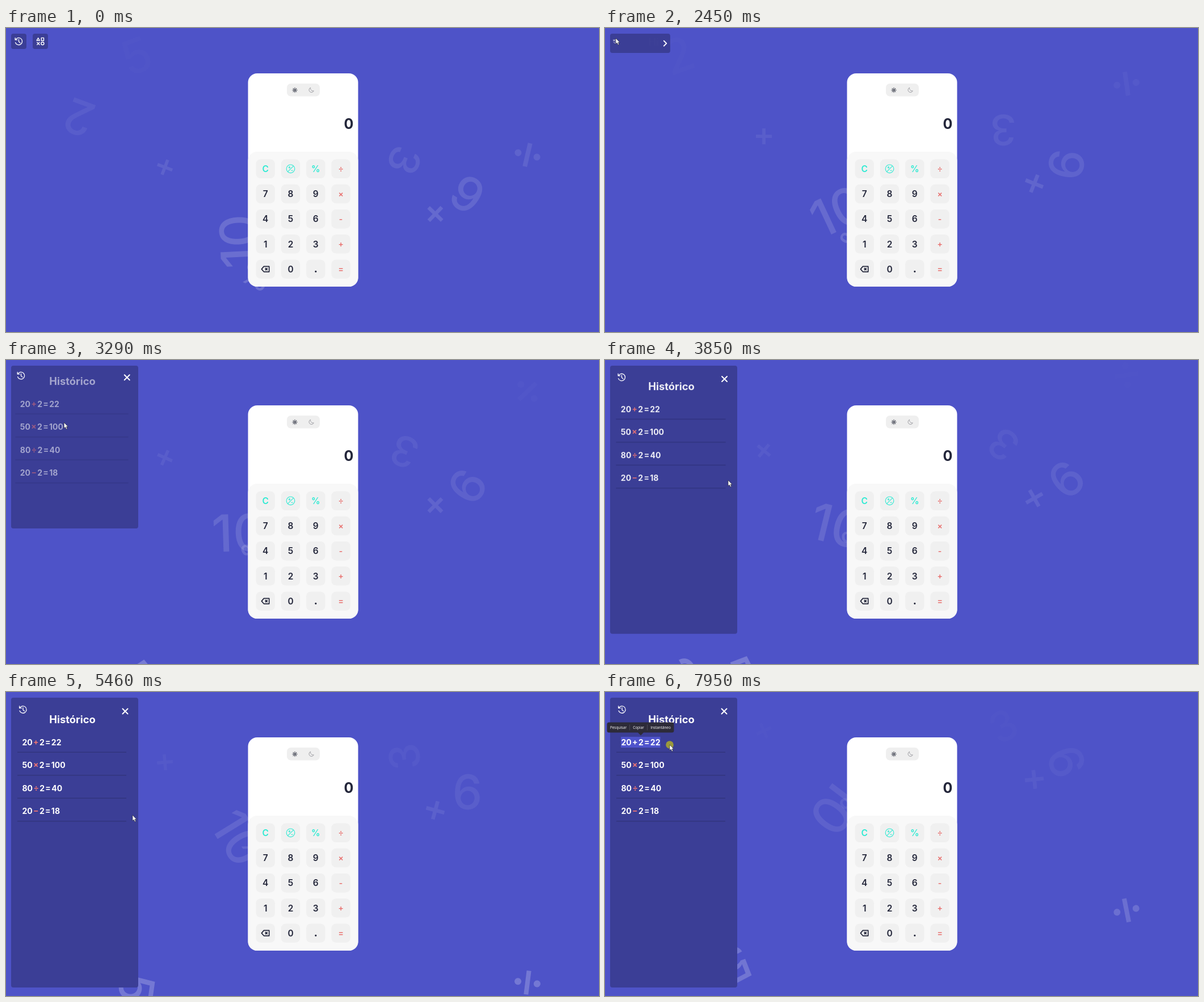
Animation, 1045 px wide and 536 px high, one loop 8 s. Source, as an HTML page:

```html
<!DOCTYPE html>
<html lang="pt">
<head>
<meta charset="utf-8">
<style>
html, body { margin: 0; width: 100%; height: 100%; overflow: hidden; background: #4e53c8; }
svg { display: block; font-family: Inter, "Open Sans", sans-serif; }
.line { fill: none; stroke: #fff; stroke-linecap: round; stroke-linejoin: round; }
text { text-anchor: middle; }
.rows text { text-anchor: start; font-weight: 700; font-size: 14px; word-spacing: -2px; fill: #fff; }
.rows tspan { fill: #ee7472; }
#popup text { font: 6.4px "Open Sans", "Noto Sans", sans-serif; fill: #fff; }
</style>
</head>
<body>
<svg width="1045" height="536">
  <defs>
    <g id="clock" class="line" stroke-width="1.3">
      <path d="M-5.6-2.8A6.2 6.2 0 1 1-5.9 2.2M-6.3-6.2V-2.6H-2.7M0-3.4V.4L2.4 2.6"/>
    </g>
    <clipPath id="clip"><rect id="clipBox" x="9" y="10" rx="4"/></clipPath>
  </defs>
  <g id="floats" fill="#fff"></g>
  <g id="card">
    <rect x="426.5" y="80" width="194" height="376" rx="16" fill="#fff"/>
    <rect x="426.5" y="218" width="194" height="238" rx="16" fill="#f8f8f8"/>
    <rect x="495" y="98" width="58" height="22.5" rx="7" fill="#efefef"/>
    <g transform="translate(509 109.5)" stroke="#282c3c" fill="none" stroke-linecap="round">
      <circle r="1.7" stroke-width="1.3"/>
      <path id="rays" stroke-width="1.1"/>
    </g>
    <path d="M536.7 105.2A4.3 4.3 0 1 0 542.3 110.8A4.6 4.6 0 0 1 536.7 105.2Z" fill="none" stroke="#9d9da3"/>
    <text x="604" y="177.5" font-size="25" font-weight="700" fill="#23263a">0</text>
    <g id="keys" font-weight="600"></g>
  </g>
  <g transform="translate(47 10)">
    <rect width="27" height="27" rx="4" fill="#3b3e96"/>
    <path class="line" stroke-width="1.4" d="M9.7 7.6L12.3 12H7.1ZM15.3 7.4H19.5V12.2H15.3ZM7.8 15.2L12 19.5M12 15.2L7.8 19.5M19.9 17.3A2.5 2.5 0 1 1 14.9 17.3A2.5 2.5 0 1 1 19.9 17.3Z"/>
  </g>
  <rect id="panel" x="9" y="10" rx="4" fill="#3b3e96"/>
  <use href="#clock" id="icon"/>
  <path id="cross" class="line" stroke-width="2"/>
  <g clip-path="url(#clip)"><g id="history">
    <text id="title" x="117" y="55" font-size="18.4" font-weight="700" fill="#fff">Histórico</text>
    <rect id="sel" y="79" height="19" fill="#4f54cc"/>
    <g class="rows" id="rows"></g>
    <g id="rules" stroke="#32357f" stroke-width="1.5"></g>
  </g></g>
  <g id="popup">
    <path d="M7 53.5H118Q121.500 53.5 121.500 57V68Q121.500 71.5 118 71.5H68L63 76.500L58 71.5H7Q3.500 71.5 3.500 68V57Q3.500 53.5 7 53.5Z" fill="#2d2b39"/>
    <path d="M43.500 57.500V67.500M74.500 57.500V67.500" stroke="#4a4856"/>
    <text x="23.500" y="64.500">Pesquisar</text><text x="59" y="64.500">Copiar</text><text x="98" y="64.500">Instantâneo</text>
  </g>
  <g id="cursor">
    <circle id="press" r="6.800" fill="#dcd700" opacity=".6"/>
    <path id="beam" d="M0-5V5" stroke="#3b3e60"/>
    <path id="arrow" d="M0 0V10L2.300 8L4 11.800L5.700 11L4.100 7.400H7Z" fill="#fff" stroke="#222" stroke-width=".6"/>
  </g>
</svg>
<script>
const $ = id => document.getElementById(id);
const set = (el, attrs) => { for (const k in attrs) el.setAttribute(k, attrs[k]); };
const show = (id, on) => $(id).style.display = on ? '' : 'none';
const clamp = (v, lo, hi) => Math.min(hi, Math.max(lo, v));
const ease = (t, from, to) => { const u = clamp((t - from) / (to - from), 0, 1); return u * u * (3 - 2 * u); };
const mix = (a, b, u) => a + (b - a) * u;

// Rising symbols: glyph, x, start y, seconds per rise, phase at time 0, size
const floats = [
  ['9', 813, 602, 26.5, .544, 84], ['3', 702, 606, 26, .656, 74],
  ['×', 756.5, 611, 26, .4985, 33], ['+', 280, 617, 25.5, .654, 28],
  ['10', 410, 587, 26, .371, 90], ['2', 129, 600, 12.6, .778, 84],
  ['5', 230, 600, 33, .9707, 84], ['%', 441, 600, 19, .287, 56],
  ['÷', 919, 589, 11.1, .643, 42]
];
const bar = (w, h, turn = 0) => `<rect x="${-w / 2}" y="${-h / 2}" width="${w}" height="${h}" transform="rotate(${turn})"/>`;
const plus = (s, turn) => `<path transform="rotate(${turn}) scale(${s / 2})" d="M-1-.2H-.2V-1H.2V-.2H1V.2H.2V1H-.2V.2H-1Z"/>`;
const shape = (c, s) =>
  c == '+' ? plus(s, 0) :
  c == '×' ? plus(s, 45) :
  c == '÷' ? bar(s, 8) + '<circle cy="-17" r="6"/><circle cy="17" r="6"/>' :
  `<text font-size="${s}" font-weight="500" y="${s * .364}">${c}</text>`;
$('floats').innerHTML = floats.map(f => `<g>${shape(f[0], f[5])}</g>`).join('');

$('rays').setAttribute('d', [...Array(8)].map((_, i) => {
  const c = Math.cos(i * Math.PI / 4), s = Math.sin(i * Math.PI / 4);
  return `M${c * 3.4} ${s * 3.4}L${c * 4.1} ${s * 4.1}`;
}).join(''));

const sign = '<g fill="none" stroke="#2eead3" stroke-width="1.1"><circle r="7.3"/><path d="M-5 5L5-5M-4-2.500H0M-2-4.500V-.5M.8 3H4.300"/></g>';
const back = '<path fill="none" stroke="#23263a" stroke-width="1.700" stroke-linejoin="round" d="M-6.800 0L-2.800-4.700H6.500V4.700H-2.800ZM-.5-2L3.500 2M3.500-2L-.5 2"/>';
const keys = ['C', sign, '%', '÷', '7', '8', '9', '×', '4', '5', '6', '-', '1', '2', '3', '+', back, '0', '.', '='];
$('keys').innerHTML = keys.map((k, i) => {
  const col = i % 4, row = i >> 2;
  const color = col == 3 ? '#e8716f' : row ? '#23263a' : '#2eead3';
  const size = k == '.' ? 21 : col == 3 ? 14 : 15.5;
  const y = k == '.' ? 5.5 : size * .364;
  const label = k.length > 1 ? k : `<text font-size="${size}" y="${y}" fill="${color}">${k}</text>`;
  return `<g transform="translate(${457.2 + col * 44.3} ${248.3 + row * 44.2})"><rect x="-16.700" y="-16.700" width="33.400" height="33.400" rx="8" fill="#f0f0f0"/>${label}</g>`;
}).join('');

const sums = ['20 + 2 = 22', '50 × 2 = 100', '80 ÷ 2 = 40', '20 − 2 = 18'];
$('rows').innerHTML = sums.map((s, i) =>
  `<text x="28.500" y="${93.6 + i * 40.5}">${s.replace(/[+×÷−]/, '<tspan>$&</tspan>')}</text>`).join('');
$('rules').innerHTML = sums.map((_, i) => `<path d="M20 ${106.3 + i * 40.5}H212"/>`).join('');
const firstSign = document.querySelector('#rows tspan');

// Pointer stops: time, x, y
const stops = [
  [100, 1034, 524], [830, 775, 484], [1700, 24, 42], [1900, 19, 18], [2750, 19, 18],
  [3290, 102, 110], [3850, 217, 212], [4150, 223, 217], [5900, 223, 217],
  [6480, 98, 94], [6560, 88, 95], [6650, 70, 95], [6710, 59, 95], [6900, 23, 95],
  [7150, 23, 95], [7600, 114, 93]
];
function pointer(t) {
  let i = stops.findIndex(s => s[0] > t);
  if (i < 0) return stops[stops.length - 1].slice(1);
  i = Math.max(i, 1);
  const [a, b] = [stops[i - 1], stops[i]];
  const u = clamp((t - a[0]) / (b[0] - a[0]), 0, 1);
  return [mix(a[1], b[1], u), mix(a[2], b[2], u)];
}

function drawFloats(t) {
  floats.forEach(([, x, y, secs, phase], i) => {
    const p = (phase + t / secs / 1000) % 1;
    set($('floats').children[i], {
      transform: `translate(${x} ${y - 568 * p}) rotate(${720 * p})`,
      opacity: .25 * (1 - p)
    });
  });
}

function drawPanel(t) {
  const p = ease(t, 2320, 4170), wide = ease(t, 2230, 2740);
  const width = 27 + 197 * wide, height = 27 + 484 * p;
  set($('panel'), { width, height });
  set($('clipBox'), { width, height });

  const dip = ease(t, 2230, 2450) - ease(t, 2450, 2900);
  const c = 22.5 + 7.5 * p;
  set($('icon'), { transform: `translate(${c - 4.5 * dip} ${c + 1}) scale(${1 - .5 * dip})` });

  // The chevron opens into a cross
  const m = ease(t, 2460, 2800);
  const a = mix(-2, -4.5, m), tip = mix(2.5, 4.5, m), end = 4.5 * m;
  set($('cross'), {
    d: `M${a}-4.500L${tip} ${end}M${a} 4.500L${tip} ${-end}`,
    transform: `translate(${9 + width - 23 + 7 * (1 - p) + 7 * (1 - m)} ${27 + 7 * p})`,
    opacity: ease(t, 2230, 2400)
  });

  const rest = 1 - p;
  set($('history'), { opacity: p, transform: `translate(0 ${-24 * rest})` });
  set($('rows'), { transform: `translate(${-8 * rest} 0)` });
  set($('rules'), { transform: `translate(${-116 * rest * .08} 0) scale(${1 + .08 * rest} 1)` });
}

function drawPointer(t) {
  const [x, y] = pointer(t);
  const dragging = t >= 6500 && t < 7100;
  show('cursor', t >= 100);
  set($('cursor'), { transform: `translate(${x} ${y})` });
  show('press', dragging || t >= 7600);
  const beam = t >= 6400 && t < 7250;
  show('beam', beam);
  show('arrow', !beam);

  const from = t < 6500 ? 97 : t < 7150 ? clamp(x + 19, 28, 97) : 28;
  const left = t > 6900 ? 28 : from;
  set($('sel'), { x: left, width: 97.5 - left });
  show('sel', left < 97);
  firstSign.style.fill = left < 52 ? '#fff' : '';
  show('popup', t >= 7620);
}

function frame(now) {
  const t = now % 8000;
  drawFloats(t);
  drawPanel(t);
  drawPointer(t);
  requestAnimationFrame(frame);
}
const start = performance.now();
const tick = () => frame(performance.now() - start);
function frameLoop() {
  const t = (performance.now() - start) % 8000;
  drawFloats(t);
  drawPanel(t);
  drawPointer(t);
  requestAnimationFrame(frameLoop);
}
frameLoop();
</script>
</body>
</html>
```
